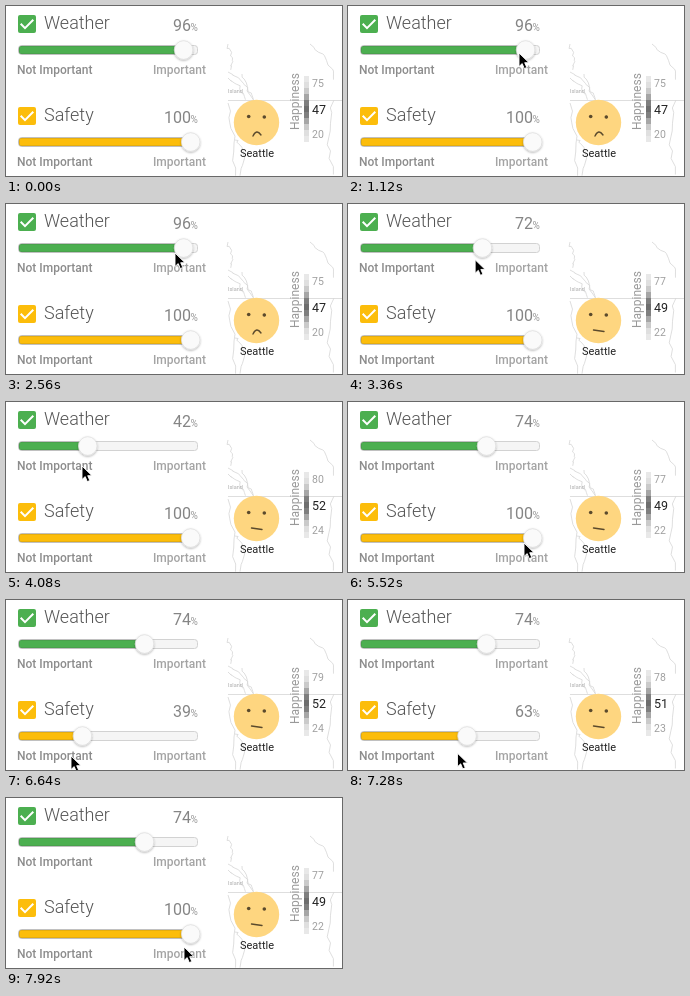
Animation, 336 px wide and 170 px high, one loop 8 s. Source, as an HTML page:

```html
<!DOCTYPE html>
<html lang="en">
<head>
<meta charset="utf-8">
<title>Happiness sliders</title>
<style>
  html, body { margin: 0; width: 100%; height: 100%; overflow: hidden; background: #fff; }
  svg { display: block; width: 336px; height: 170px; font-family: Roboto, sans-serif; }
  .title { font-size: 18px; font-weight: 300; fill: #555; }
  .value { font-size: 16px; fill: #858585; text-anchor: end; }
  .percent { font-size: 10px; fill: #999; }
  .label { font-size: 12px; font-weight: 500; fill: #8c8c8c; }
  .right { fill: #a4a4a4; text-anchor: end; }
  .tick { font-size: 10.5px; fill: #a0a0a0; }
  #map { fill: none; stroke: #d6d6d6; stroke-width: .8; }
  #mouth { fill: none; stroke: #5b4a2c; stroke-width: 1.4; stroke-linecap: round; }
</style>
</head>
<body>
<svg viewBox="0 0 336 170">
  <defs>
    <filter id="shadow" x="-30%" y="-30%" width="160%" height="170%">
      <feDropShadow dx="0" dy="1" stdDeviation="1" flood-opacity=".3"/>
    </filter>
  </defs>

  <path id="map"/>
  <text x="222" y="87" font-size="5.5" fill="#aaa">Island</text>

  <g id="sliders"></g>

  <circle cx="250.5" cy="116.5" r="22.7" fill="#fed680"/>
  <g fill="#5b4a2c">
    <circle cx="242.7" cy="110.5" r="1.8"/>
    <circle cx="258.3" cy="111" r="1.8"/>
  </g>
  <path id="mouth"/>
  <text x="251" y="151" font-size="11" fill="#222" text-anchor="middle">Seattle</text>

  <text transform="translate(293 124) rotate(-90)" font-size="12" fill="#999">Happiness</text>
  <g id="scale"></g>
  <text id="high" class="tick" x="306" y="81"></text>
  <text id="mid" x="306" y="108" font-size="12.5" fill="#222"></text>
  <text id="low" class="tick" x="306" y="132"></text>

  <path id="cursor" d="M0 0V13.5L3.2 10.6 5.3 15.6 7.8 14.5 5.7 9.7H10Z" stroke="#fff" stroke-width=".9"/>
</svg>
<script>
const $ = id => document.getElementById(id);
const STEP = 80, LOOP = 8000, ENTER = 640;

// The cursor's stops and the slider values it leaves behind
const first = { x: 318, y: 28, weather: 96, safety: 100 };
const moves = [
  { from: ENTER, to: 1120, x: 171, y: 47 },
  { from: 1520, to: 1920, x: 169, y: 49 },
  { from: 2800, to: 4000, x: 76, y: 64, weather: 42 },
  { from: 4080, to: 4880, x: 131, y: 69, weather: 74 },
  { from: 5040, to: 5520, x: 176, y: 141 },
  { from: 5840, to: 6640, x: 65, y: 156, safety: 39 },
  { from: 6800, to: 7920, x: 178, y: 149, safety: 100 }
];

function ease(t, from, to) {
  const p = Math.min(1, Math.max(0, (t - from) / (to - from)));
  return p * p * (3 - 2 * p);
}

function stateAt(t) {
  const state = { ...first };
  for (const { from, to, ...goal } of moves) {
    const p = ease(t, from, to);
    for (const key in goal) state[key] += (goal[key] - state[key]) * p;
  }
  return state;
}

function addSlider(name, y, color) {
  const g = document.createElementNS('http://www.w3.org/2000/svg', 'g');
  g.setAttribute('transform', `translate(0 ${y})`);
  g.innerHTML = `
    <rect x="12" y="9" width="18" height="18" rx="2" fill="${color}"/>
    <path d="M14.7 17.8L19 22.1 27.3 13.8" fill="none" stroke="#fff" stroke-width="2"/>
    <text class="title" x="38" y="23">${name}</text>
    <text class="value" x="185" y="25"></text>
    <text class="percent" x="184.5" y="25">%</text>
    <rect x="12.5" y="39.5" width="179" height="9" rx="3" fill="#f5f5f5" stroke="#d2d2d2"/>
    <rect class="fill" x="13" y="40" height="8" rx="2.5" fill="${color}"/>
    <rect class="fill" x="13" y="40" height="8" rx="2.5" fill="none" stroke="#333" stroke-opacity=".22"/>
    <text class="label" x="11" y="68">Not Important</text>
    <text class="label right" x="200" y="68">Important</text>
    <circle class="knob" cy="44" r="9.3" fill="#fafafa" stroke="#ddd" stroke-width=".7" filter="url(#shadow)"/>`;
  $('sliders').append(g);
  return v => {
    const x = 7.2 + 1.775 * v;
    g.querySelector('.value').textContent = Math.round(v);
    g.querySelectorAll('.fill').forEach(bar => bar.setAttribute('width', x - 13));
    g.querySelector('.knob').setAttribute('cx', x);
  };
}

let seed = 7;
const random = () => (seed = seed * 16807 % 2147483647) / 2147483647;

// A ragged shoreline that bends through one middle point
function coast(x0, y0, x1, y1, x2, y2) {
  let d = `M${x0} ${y0}`;
  for (let p = 0.1; p < 1.05; p += 0.1) {
    const q = 1 - p, wobble = () => random() * 4 - 2;
    d += `L${q * q * x0 + 2 * q * p * x1 + p * p * x2 + wobble()} ${q * q * y0 + 2 * q * p * y1 + p * p * y2 + wobble()}`;
  }
  return d;
}

$('map').setAttribute('d', 'M222 94.5H336'
  + coast(222, 38, 228, 52, 224, 64)
  + coast(222, 66, 238, 72, 246, 94)
  + coast(222, 72, 234, 80, 240, 94)
  + coast(236, 68, 240, 84, 248, 94)
  + coast(222, 97, 229, 130, 228, 168)
  + coast(229, 134, 240, 140, 236, 168)
  + coast(304, 38, 322, 46, 329, 72)
  + coast(328, 94, 316, 130, 328, 168));

const setWeather = addSlider('Weather', 0, '#4caf50');
const setSafety = addSlider('Safety', 92, '#fcbd0b');

for (let i = 0; i < 11; i++) {
  const shade = 235 - 125 * Math.exp(-(((i - 5) / 2.6) ** 2));
  $('scale').innerHTML += `<rect x="298" y="${70 + i * 6}" width="5" height="6" fill="rgb(${shade},${shade},${shade})"/>`;
}

function draw() {
  const t = Math.floor((performance.now() - start) % LOOP / STEP) * STEP;
  const { x, y, weather, safety } = stateAt(t);
  const calm = (96 - weather) / 54, bold = (100 - safety) / 61;
  const happy = 47 + 5 * calm + 3 * bold;
  setWeather(weather);
  setSafety(safety);
  $('high').textContent = Math.round(75 + 5 * calm + 2 * bold);
  $('mid').textContent = Math.round(happy);
  $('low').textContent = Math.round(20 + 4 * calm + 2 * bold);
  $('mouth').setAttribute('d', happy < 48 ? 'M247 130Q250.5 122.5 255 129' : 'M245.5 126L256 127.5');
  $('cursor').setAttribute('transform', `translate(${x} ${y})`);
  $('cursor').setAttribute('visibility', t < ENTER ? 'hidden' : 'visible');
  requestAnimationFrame(draw);
}
const start = performance.now();
draw();
</script>
</body>
</html>
```
